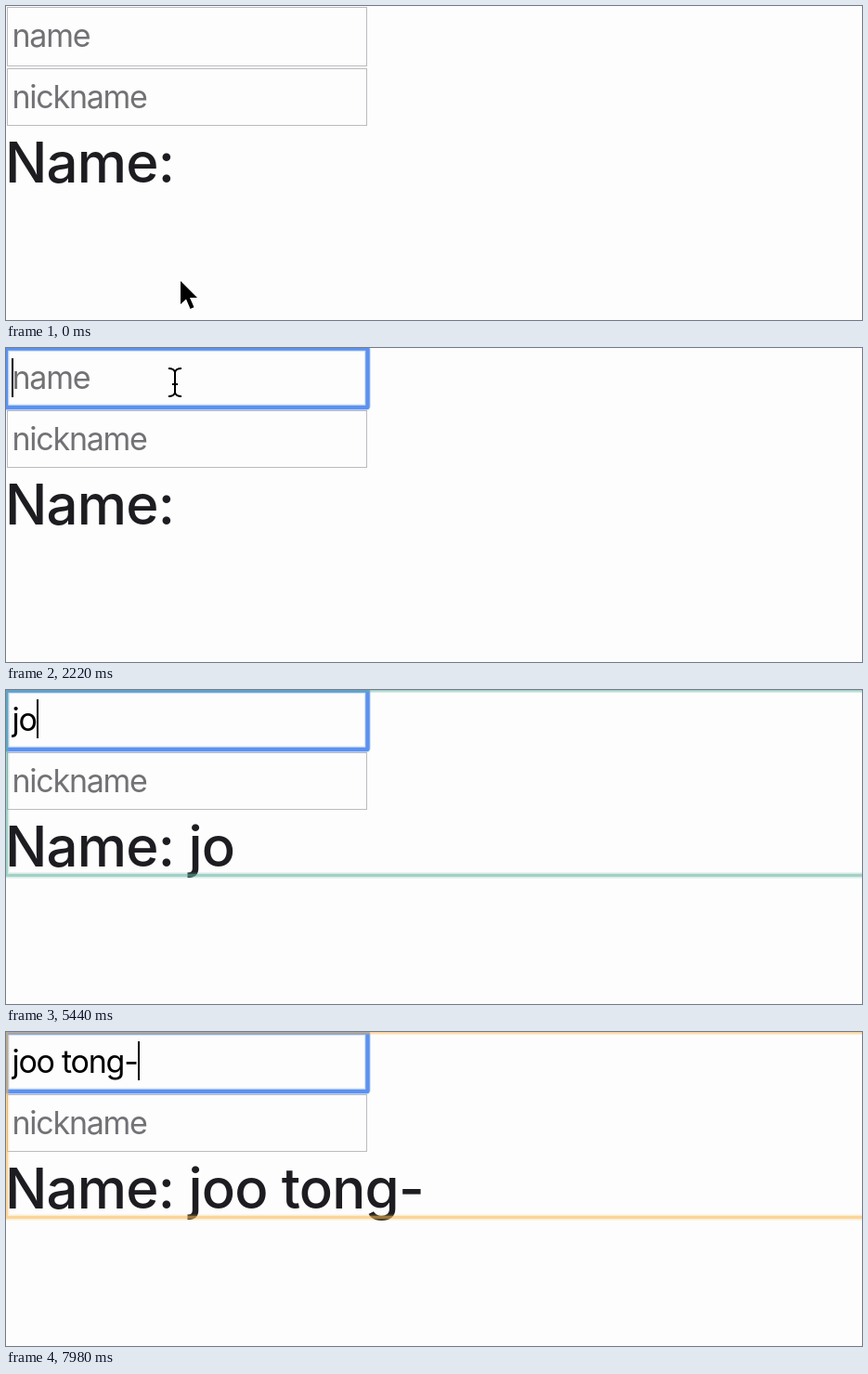
An HTML page for the animation above (8000 ms loop, 922 by 338 pixels).

```html
<!DOCTYPE html>
<html lang="en">
<head>
<meta charset="utf-8">
<title>Name form</title>
<style>
  html, body { margin: 0; width: 100%; height: 100%; overflow: hidden; background: #fdfdfd; }
  svg { display: block; width: 100%; height: 100%; }
  text { font-family: Inter, "Liberation Sans", sans-serif; white-space: pre; }
  .field { fill: none; stroke: #bcbcc0; }
  .input { font-size: 34px; letter-spacing: -1.25px; }
  .hint { fill: #727276; }
  .heading { font-size: 60px; font-weight: 500; letter-spacing: -0.8px; fill: #1d1d21; }
  .ring, .outline { fill: none; }
  .ring { stroke: #5c92ee; }
  .halo { stroke: #fff; }
</style>
</head>
<body>
<svg viewBox="0 0 922 338" preserveAspectRatio="xMinYMin meet">
  <rect class="field" x="1.5" y="1.5" width="387" height="63"/>
  <rect class="field" x="1.5" y="67.5" width="387" height="61"/>
  <g id="focus">
    <rect class="ring" x="0" y="0.5" width="389.5" height="63.5" rx="2" stroke-width="7" opacity="0.25"/>
    <rect class="ring" x="0" y="0.5" width="389.5" height="63.5" rx="1" stroke-width="4.5"/>
  </g>
  <text id="nameHint" class="input hint" x="6.5" y="44">name</text>
  <text class="input hint" x="6.5" y="110">nickname</text>
  <text id="value" class="input" x="6.5" y="44"></text>
  <rect id="caret" y="11" width="2" height="42"/>
  <text id="heading" class="heading" x="-1" y="190"></text>
  <g id="highlight" class="outline">
    <rect x="0.5" y="0" width="940" height="199.5" stroke-width="6" opacity="0.25"/>
    <rect x="0.5" y="0" width="940" height="199.5" stroke-width="3" opacity="0.45"/>
  </g>
  <path id="arrow" d="M0 0V25L6 19.5L10.5 30L14.5 28.3L10 18H18Z"
        stroke="#fff" stroke-width="3" stroke-linejoin="round" paint-order="stroke"/>
  <g id="beam" fill="none">
    <path class="halo" stroke-width="4" d="M-7-15q6 0 7 4q1-4 7-4M0-11V11M-7 15q6 0 7-4q1 4 7 4M-3 2h6"/>
    <path stroke="#000" stroke-width="2" d="M-7-15q6 0 7 4q1-4 7-4M0-11V11M-7 15q6 0 7-4q1 4 7 4M-3 2h6"/>
  </g>
</svg>
<script>
const LOOP = 8000;
const FOCUS_AT = 1860;
const TYPED = "joo tong-";
const KEY_TIMES = [4800, 5200, 5520, 5860, 6240, 6560, 7000, 7400, 7760];
// The update outline warms up with every keystroke.
const HEAT = ["#37afa9", "#63b19e", "#80b393", "#97b488", "#abb67d",
              "#beb771", "#cfb965", "#dfba57", "#f8b850"];
// Pointer path: time, x, y
const PATH = [[60, 188, 296], [800, 184, 48], [1000, 182, 37]];

const el = id => document.getElementById(id);
const [focusRing, nameHint, value, caret, heading, highlight, arrow, beam] =
  ["focus", "nameHint", "value", "caret", "heading", "highlight", "arrow", "beam"].map(el);
const show = (node, on) => node.setAttribute("visibility", on ? "visible" : "hidden");

function pointerAt(t) {
  if (t <= PATH[0][0]) return PATH[0].slice(1);
  for (let i = 1; i < PATH.length; i++) {
    const [t0, x0, y0] = PATH[i - 1], [t1, x1, y1] = PATH[i];
    if (t < t1) {
      const p = (t - t0) / (t1 - t0), e = p * p * (3 - 2 * p);
      return [x0 + (x1 - x0) * e, y0 + (y1 - y0) * e];
    }
  }
  return PATH[PATH.length - 1].slice(1);
}

function draw(t) {
  const count = KEY_TIMES.filter(k => k <= t).length;
  const text = TYPED.slice(0, count);
  const focused = t >= FOCUS_AT;

  value.textContent = text;
  heading.textContent = "Name: " + text;
  show(nameHint, !count);
  show(focusRing, focused);
  show(caret, focused);
  caret.setAttribute("x", count ? Math.round(7 + value.getComputedTextLength()) : 6);
  caret.setAttribute("y", count ? 10 : 11);

  show(highlight, count);
  if (count) highlight.setAttribute("stroke", HEAT[count - 1]);

  const [x, y] = pointerAt(t);
  const overField = y < 129;
  for (const node of [arrow, beam]) node.setAttribute("transform", `translate(${x} ${y})`);
  show(arrow, !overField);
  show(beam, overField && !count);
}

const start = performance.now();
function frame() {
  draw((performance.now() - start) % LOOP);
  requestAnimationFrame(frame);
}
frame();
</script>
</body>
</html>
```
